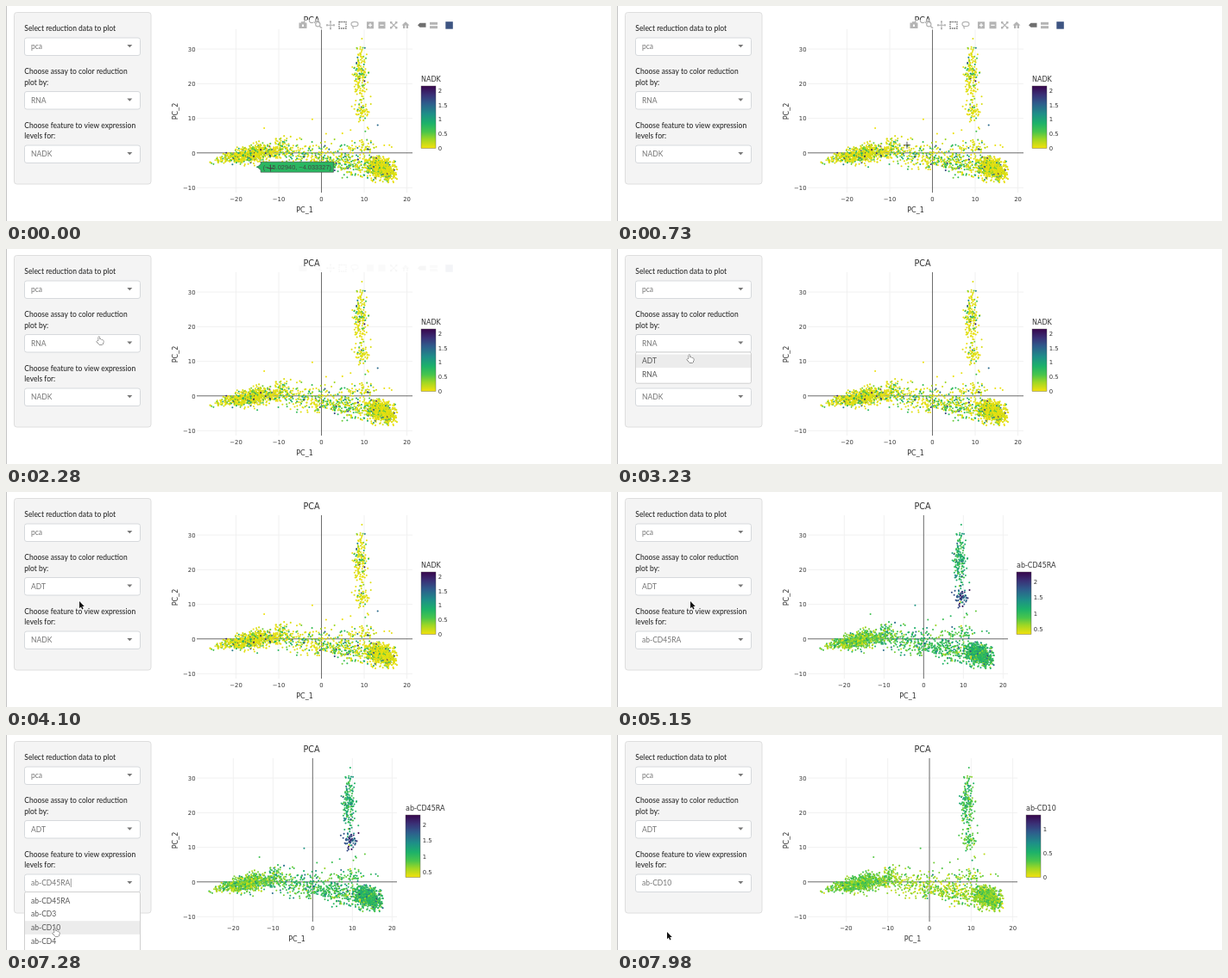
These frames come from a looping animation (701x250 px, 8000 ms). An HTML page with a canvas:

```html
<!DOCTYPE html>
<html lang="en">
<head>
<meta charset="utf-8">
<title>Reduction plot</title>
<style>
  html, body { margin: 0; width: 100%; height: 100%; overflow: hidden; background: #fff; }
  canvas { display: block; }
</style>
</head>
<body>
<canvas id="stage" width="701" height="250"></canvas>
<script>
const W = 701, H = 250, LOOP = 8000;
const ctx = document.getElementById('stage').getContext('2d');

const UI = '8.5px Lato, sans-serif';
const plotFont = size => size + 'px "DejaVu Sans", sans-serif';
const HOVER = '7.4px "Liberation Sans", Arial, sans-serif';
const INK = '#333';

// Events, in ms
const ASSAY_OPEN = 2550, ASSAY_PICK = 3450, PLOT_ADT = 4600;
const CARET = 6500, FEATURE_OPEN = 6680, FEATURE_PICK = 7300, PLOT_CD10 = 7700;

const VIEWS = [
  { name: 'NADK', bar: 481, scale: 4.95, min: 0, max: 2.165, ticks: [0, 0.5, 1, 1.5, 2] },
  { name: 'ab-CD45RA', bar: 463, scale: 4.6, min: 0.35, max: 2.31, ticks: [0.5, 1, 1.5, 2] },
  { name: 'ab-CD10', bar: 474, scale: 4.83, min: 0, max: 1.286, ticks: [0, 0.5, 1] }
];
const STOPS = [
  [0, 240, 224, 14], [0.14, 158, 215, 36], [0.26, 72, 197, 76], [0.4, 28, 177, 106],
  [0.55, 30, 142, 136], [0.72, 46, 92, 140], [0.86, 58, 48, 118], [1, 56, 6, 76]
];

const clamp = (v, a, b) => Math.min(b, Math.max(a, v));
const smooth = k => k * k * (3 - 2 * k);
const yPos = y => 171 - y * 4.03;
const xPos = (view, x) => 221 + (x + 29.2) * view.scale;

function ramp(v) {
  v = clamp(v, 0, 1);
  const i = Math.max(1, STOPS.findIndex(s => s[0] >= v));
  const a = STOPS[i - 1], b = STOPS[i], k = (v - a[0]) / (b[0] - a[0]);
  return `rgb(${[1, 2, 3].map(c => Math.round(a[c] + (b[c] - a[c]) * k))})`;
}

let seed = 4711;
function rnd() {
  seed = (seed * 1664525 + 1013904223) >>> 0;
  return seed / 4294967296;
}
const gauss = () => Math.sqrt(-2 * Math.log(1 - rnd())) * Math.cos(2 * Math.PI * rnd());

// Each group places a cell and gives its mean level for the two antibodies
const GROUPS = [
  { share: 0.33, green: 0.2, levels: [0.2, 0.21], place() {
    const x = -16.3 + 3.6 * gauss();
    const spread = clamp(1.1 + 0.05 * (x + 16.3), 0.6, 1.2);
    return [Math.max(x, -26.5 + rnd()), -0.3 + 0.2 * (x + 16.3) + spread * gauss()];
  } },
  { share: 0.32, green: 0.17, levels: [0.34, 0.17], place() {
    const x = 14.1 + 1.6 * gauss();
    const y = -4.4 - 0.4 * (x - 14.1) + 1.5 * gauss();
    return [Math.min(x, 17.8 - rnd()), Math.max(y, -9 + rnd())];
  } },
  { share: 0.21, green: 0.42, levels: [0.3, 0.14], place() {
    const x = -12 + 25 * Math.pow(rnd(), 0.75);
    return [x, 1.2 - 0.24 * (x + 12) + 1.7 * gauss()];
  } },
  { share: 0.1, green: 0.18, levels: [0.38, 0.29], place() {
    const part = rnd();
    if (part < 0.7) return [9.1 + 0.75 * gauss(), Math.min(33, 23.2 + 3.2 * gauss())];
    if (part < 0.9) return [9.5 + 0.9 * gauss(), 12.3 + 1.1 * gauss()];
    return [9.2 + gauss(), 9 + 10 * rnd()];
  } },
  { share: 0.04, green: 0.2, levels: [0.3, 0.18], place() {
    const x = rnd() < 0.5 ? 9 + 3 * gauss() : -14 + 26 * rnd();
    return [x, Math.min(14, 0.8 - 2.4 * Math.log(1 - rnd()))];
  } }
];

function rnaLevel(green) {
  const r = rnd();
  if (r < 0.045) return 0.55 + 0.4 * rnd();
  return r < green + 0.045 ? 0.12 + 0.33 * rnd() : 0.05 * rnd();
}

function makeCell() {
  let r = rnd();
  const group = GROUPS.find(g => (r -= g.share) < 0) || GROUPS[0];
  const [x, y] = group.place();
  const [ra, ten] = group.levels;
  const dark = group === GROUPS[3] && y < 14.5;
  return { x, y, level: [
    rnaLevel(group.green),
    dark ? 0.77 + 0.12 * gauss() : ra + 0.1 * gauss() + (rnd() < 0.06 ? 0.3 : 0),
    ten + 0.08 * gauss() + (rnd() < 0.04 ? 0.22 : 0)
  ] };
}
const cells = Array.from({ length: 2350 }, makeCell);
cells.push({ x: -15.0294, y: -4.033, level: [0.36, 0.2, 0.2] });
cells.push({ x: 1.080278, y: 5.586, level: [0, 0.3, 0.2] });

function text(c, str, x, y, font, color, align = 'left') {
  c.font = font;
  c.fillStyle = color;
  c.textAlign = align;
  c.fillText(str, x, y);
}

function line(c, x1, y1, x2, y2, color, width = 1) {
  c.strokeStyle = color;
  c.lineWidth = width;
  c.beginPath();
  c.moveTo(x1, y1);
  c.lineTo(x2, y2);
  c.stroke();
}

function box(x, y, w, h, r, fill, stroke) {
  ctx.beginPath();
  ctx.roundRect(x, y, w, h, r);
  ctx.fillStyle = fill;
  ctx.fill();
  ctx.strokeStyle = stroke;
  ctx.lineWidth = 1;
  ctx.stroke();
}

function renderPlot(view, index) {
  const layer = document.createElement('canvas');
  layer.width = W;
  layer.height = H;
  const c = layer.getContext('2d');
  const right = view.bar - 10, label = plotFont(6.84);
  const zero = xPos(view, 0);

  for (const v of [-20, -10, 0, 10, 20]) {
    const x = xPos(view, v);
    if (v) line(c, x, 27, x, 217, '#f1f1f1');
    text(c, String(v).replace('-', '\u2212'), x, 227, label, INK, 'center');
  }
  for (const v of [-10, 0, 10, 20, 30]) {
    const y = yPos(v);
    if (v) line(c, 221, y, right, y, '#f1f1f1');
    text(c, String(v).replace('-', '\u2212'), 219.5, y + 2.6, label, INK, 'right');
  }
  line(c, 221, 170.8, right, 170.8, '#444', 0.8);
  line(c, zero, 27, zero, 217, '#444', 0.8);

  for (const p of cells) {
    c.fillStyle = ramp(p.level[index]);
    c.beginPath();
    c.arc(xPos(view, p.x), yPos(p.y), 1.03, 0, 7);
    c.fill();
  }

  text(c, 'PCA', 354, 19.8, plotFont(9.7), INK, 'center');
  text(c, 'PC_1', (221 + right) / 2, 240, plotFont(8), INK, 'center');
  c.save();
  c.translate(198.5, 122.5);
  c.rotate(-Math.PI / 2);
  text(c, 'PC_2', 0, 0, plotFont(8), INK, 'center');
  c.restore();

  const fill = c.createLinearGradient(0, 165, 0, 93);
  STOPS.forEach(s => fill.addColorStop(s[0], ramp(s[0])));
  c.fillStyle = fill;
  c.fillRect(view.bar, 93, 17, 72.5);
  c.strokeStyle = '#555';
  c.lineWidth = 0.4;
  c.strokeRect(view.bar, 93, 17, 72.5);
  text(c, view.name, view.bar, 88, plotFont(8), INK);
  for (const v of view.ticks) {
    const y = 165 - (v - view.min) / (view.max - view.min) * 72;
    text(c, String(v), view.bar + 19.7, y + 2.5, label, INK);
  }
  return layer;
}
const plots = VIEWS.map(renderPlot);

function select(y, value) {
  box(21.5, y, 134, 20.5, 2.5, '#fff', '#d6d9dc');
  text(ctx, value, 29, y + 13.3, UI, '#757575');
  ctx.fillStyle = '#777';
  ctx.beginPath();
  ctx.moveTo(140.3, y + 8);
  ctx.lineTo(146.3, y + 8);
  ctx.lineTo(143.3, y + 11.2);
  ctx.fill();
}

function menu(y, items, active) {
  box(21.5, y, 134, items.length * 15.6 + 5, 2, '#fff', '#d0d0d0');
  items.forEach((item, i) => {
    const top = y + 2.5 + i * 15.6;
    if (i === active) {
      ctx.fillStyle = '#ececec';
      ctx.fillRect(22, top, 133, 15.6);
    }
    text(ctx, item, 29, top + 10.8, UI, '#555');
  });
}

function sidebar(t, pointer) {
  box(9.5, 7.5, 158.5, 199.5, 3, '#f4f4f4', '#dedede');
  const labels = [
    ['Select reduction data to plot', 28.7],
    ['Choose assay to color reduction', 79.2], ['plot by:', 91.5],
    ['Choose feature to view expression', 141.7], ['levels for:', 154]
  ];
  labels.forEach(([s, y]) => text(ctx, s, 21.3, y, UI, '#1c1c1c'));
  const feature = t < PLOT_ADT ? 0 : t < FEATURE_PICK ? 1 : 2;
  select(37, 'pca');
  select(99.5, t < ASSAY_PICK ? 'RNA' : 'ADT');
  select(162, VIEWS[feature].name);
  if (t >= CARET && t < FEATURE_PICK) line(ctx, 75.3, 167, 75.3, 177, '#777', 0.7);

  const row = top => Math.floor((pointer.y - top - 2.5) / 15.6);
  if (t >= ASSAY_OPEN && t < ASSAY_PICK) menu(120, ['ADT', 'RNA'], row(120));
  if (t >= FEATURE_OPEN && t < FEATURE_PICK) {
    menu(182.5, ['ab-CD45RA', 'ab-CD3', 'ab-CD10', 'ab-CD4', 'ab-CD8a'], row(182.5));
  }
}

function toolbar(alpha) {
  if (alpha <= 0) return;
  const c = ctx, light = '#b4b4b4', dark = '#6f6f6f';
  const rect = (x, y, w, h, color = light) => { c.fillStyle = color; c.fillRect(x, y, w, h); };
  const ring = (x, y, rx, ry) => {
    c.strokeStyle = light;
    c.lineWidth = 1.2;
    c.beginPath();
    c.ellipse(x, y, rx, ry, 0, 0, 7);
    c.stroke();
  };
  c.save();
  c.globalAlpha = alpha;
  rect(338, 16, 182, 12, 'rgba(255,255,255,.5)');
  // camera
  rect(339.5, 19.5, 9, 6.5);
  rect(342, 18.2, 4, 2);
  rect(343, 21.5, 2, 2.5, '#fff');
  // magnifier
  ring(361.3, 21.3, 2.6, 2.6);
  line(c, 363.2, 23.2, 366, 26, light, 1.6);
  // pan
  line(c, 372, 22.3, 380, 22.3, light, 1.1);
  line(c, 376, 18.3, 376, 26.3, light, 1.1);
  for (const [dx, dy] of [[4, 0], [-4, 0], [0, 4], [0, -4]]) rect(375 + dx, 21.3 + dy, 2, 2);
  // box select
  c.setLineDash([1.6, 0.9]);
  c.strokeStyle = dark;
  c.lineWidth = 1.3;
  c.strokeRect(386, 18.5, 8, 7.5);
  c.setLineDash([]);
  // lasso
  ring(404, 21, 4, 2.6);
  line(c, 401.5, 23, 402.5, 26.5, light, 1.2);
  // zoom in and out
  for (const x of [418, 431.5]) {
    rect(x, 18.3, 8, 8);
    line(c, x + 1.8, 22.3, x + 6.2, 22.3, '#fff', 1.2);
  }
  line(c, 422, 20.1, 422, 24.5, '#fff', 1.2);
  // autoscale
  line(c, 445.5, 18.6, 453, 26, light, 1.2);
  line(c, 453, 18.6, 445.5, 26, light, 1.2);
  for (const x of [445, 451]) for (const y of [18, 24]) rect(x, y, 2.4, 2.4);
  // home
  c.fillStyle = light;
  c.beginPath();
  c.moveTo(458.5, 22.6);
  c.lineTo(463, 18.3);
  c.lineTo(467.5, 22.6);
  c.fill();
  rect(460, 22, 2.3, 4);
  rect(463.7, 22, 2.3, 4);
  // hover modes
  c.fillStyle = dark;
  c.beginPath();
  c.moveTo(477, 22.3);
  c.lineTo(479.5, 19.8);
  c.lineTo(486.5, 19.8);
  c.lineTo(486.5, 24.8);
  c.lineTo(479.5, 24.8);
  c.fill();
  rect(491, 18.8, 9, 3);
  rect(491, 23.2, 9, 3);
  rect(509.3, 18.2, 8.5, 8.5, '#3d5482');
  c.restore();
}

function hoverLabel(x, y, str, level) {
  const px = xPos(VIEWS[0], x), py = yPos(y);
  ctx.font = HOVER;
  const end = px + 4 + ctx.measureText(str).width + 5;
  ctx.beginPath();
  ctx.moveTo(px, py);
  ctx.lineTo(px + 4, py - 3.4);
  ctx.lineTo(px + 4, py - 6);
  ctx.lineTo(end, py - 6);
  ctx.lineTo(end, py + 6);
  ctx.lineTo(px + 4, py + 6);
  ctx.lineTo(px + 4, py + 3.4);
  ctx.closePath();
  ctx.fillStyle = ramp(level);
  ctx.fill();
  ctx.strokeStyle = '#444';
  ctx.lineWidth = 0.6;
  ctx.stroke();
  text(ctx, str, px + 6.5, py + 2.7, HOVER, '#444');
}

const PATH = [
  [0, 306, 188], [300, 306, 188], [1200, 369, 131], [1560, 369, 131],
  [2200, 109, 106], [2600, 109, 106], [3000, 85, 127], [5900, 85, 127],
  [6400, 69, 171], [6800, 69, 171], [7150, 58, 229], [LOOP, 58, 229]
];
function pointerAt(t) {
  const i = PATH.findIndex(k => k[0] > t), a = PATH[i - 1], b = PATH[i];
  const k = smooth((t - a[0]) / (b[0] - a[0]));
  return { x: a[1] + (b[1] - a[1]) * k, y: a[2] + (b[2] - a[2]) * k };
}

const ARROW = new Path2D('M0 0V8.2L1.9 6.5L3.2 9.4L4.6 8.8L3.3 6H5.8Z');
const HAND = new Path2D('M-1.8 .8V-3.6Q-1.1-4.8-.4-3.6V-.8Q.7-1.6 1.2-.5Q2.2-1 2.6 0Q3.7-.3 3.8 .8V2.6L2.8 5H-1.2L-3.8 1.6Q-3.4 .2-1.8 .8Z');
const CURSORS = [
  [1940, 'cross'], [2080, 'arrow'], [ASSAY_PICK, 'hand'], [6250, 'arrow'],
  [6800, 'beam'], [FEATURE_PICK + 50, 'hand'], [LOOP, 'arrow']
];

function cursor(t, { x, y }) {
  const kind = CURSORS.find(k => t < k[0])[1];
  ctx.save();
  ctx.translate(x, y);
  if (kind === 'cross') {
    line(ctx, -3.5, 0.5, 4.5, 0.5, '#444', 0.9);
    line(ctx, 0.5, -3.5, 0.5, 4.5, '#444', 0.9);
  } else if (kind === 'beam') {
    line(ctx, 0.5, -4, 0.5, 4, '#222', 1);
    line(ctx, -1.5, -4.3, 2.5, -4.3, '#222', 0.9);
    line(ctx, -1.5, 4.3, 2.5, 4.3, '#222', 0.9);
  } else {
    const arrow = kind === 'arrow', shape = arrow ? ARROW : HAND;
    ctx.strokeStyle = arrow ? '#fff' : '#222';
    ctx.lineWidth = arrow ? 1.4 : 0.9;
    ctx.fillStyle = arrow ? '#111' : '#fff';
    ctx.stroke(shape);
    ctx.fill(shape);
  }
  ctx.restore();
}

function draw(t) {
  const pointer = pointerAt(t);
  ctx.fillStyle = '#fff';
  ctx.fillRect(0, 0, W, H);
  ctx.fillStyle = '#c4c4c4';
  ctx.fillRect(0, 0, 1, H);
  ctx.drawImage(plots[t < PLOT_ADT ? 0 : t < PLOT_CD10 ? 1 : 2], 0, 0);
  toolbar(clamp((2300 - t) / 300, 0, 1));
  if (t < 600) hoverLabel(-15.0294, -4.033327, '(\u221215.02940, \u22124.033327)', 0.36);
  else if (t >= 900 && t < 1620) hoverLabel(1.080278, 5.586347, '(1.080278, 5.586347)', 0);
  sidebar(t, pointer);
  cursor(t, pointer);
}

const start = performance.now();
function tick() {
  draw((performance.now() - start) % LOOP);
  requestAnimationFrame(tick);
}
tick();
</script>
</body>
</html>
```
